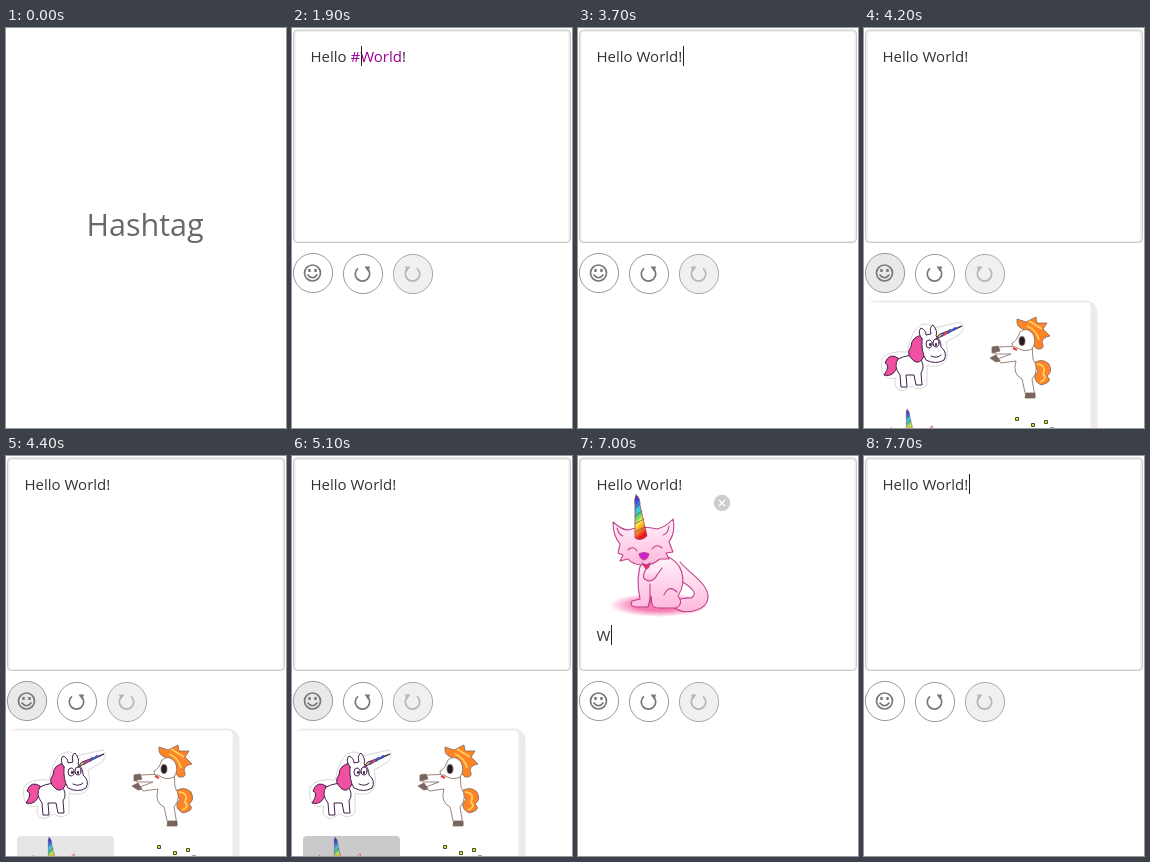
An HTML page that plays this animation: 280x400 px, repeating every 8000 ms.

```html
<!DOCTYPE html>
<html lang="en">
<head>
<meta charset="utf-8">
<title>Editor demo</title>
<style>
  html, body { margin: 0; width: 100%; height: 100%; overflow: hidden; background: #fff; }
  svg { display: block; width: 280px; height: 400px; }
  text { font: 15px "Open Sans", "Noto Sans", sans-serif; fill: #333; white-space: pre; }
  #title { font-size: 30.5px; fill: #686868; }
  .tag { fill: #980095; }
  .btn { fill: #fff; stroke: #999; }
  .icon { fill: none; stroke: #777; stroke-width: 1.7; }
</style>
</head>
<body>
<svg viewBox="0 0 280 400">
  <defs>
    <linearGradient id="rainbow" x1="0" y1="0" x2=".25" y2="1">
      <stop offset="0" stop-color="#38209c"/>
      <stop offset=".2" stop-color="#2860e0"/>
      <stop offset=".36" stop-color="#30c8e8"/>
      <stop offset=".52" stop-color="#58d868"/>
      <stop offset=".66" stop-color="#fff040"/>
      <stop offset=".82" stop-color="#ff9820"/>
      <stop offset="1" stop-color="#e81828"/>
    </linearGradient>
    <linearGradient id="fur" x1="0" y1="0" x2="0" y2="1">
      <stop offset="0" stop-color="#fff4fa"/>
      <stop offset="1" stop-color="#ffb8dc"/>
    </linearGradient>
    <radialGradient id="glow">
      <stop offset=".5" stop-color="#f87cb4"/>
      <stop offset="1" stop-color="#f87cb4" stop-opacity="0"/>
    </radialGradient>
    <g id="cat" stroke-linejoin="round" stroke-linecap="round">
      <ellipse cx="81" cy="149" rx="50" ry="12" fill="url(#glow)"/>
      <g fill="url(#fur)" stroke="#c0408c" stroke-width="1.1">
        <path d="M98 122C116 132 120 138 113 142C102 141 94 146 97 152C108 160 129 154 130 142C131 128 112 118 102 106"/>
        <path d="M64 104C58 120 60 134 62 143L54 145Q51 151 59 151H70L73 140L74 148Q75 153 86 152H98Q106 148 100 140C110 124 104 106 88 100Z"/>
        <path d="M86 139Q91 128 99 136M72 147V128" fill="none"/>
        <path d="M68 113Q63 122 68 124Q75 127 79 119L84 112" />
        <path d="M35 66Q44 74 50 74Q64 69 79 73Q88 71 95 63Q98 76 91 86L95 96L88 97L91 103L82 103Q73 110 65 109Q55 109 50 103L42 105L45 99L40 97L42 88Q35 80 35 66Z"/>
        <path d="M39 72Q41 79 45 80M91 70Q90 78 85 79M50 94Q55 89 59 95M74 93Q79 87 84 92" fill="none"/>
        <path d="M61 98Q66 95 71 98Q70 103 66 104Q62 102 61 98Z" fill="#d020d8"/>
        <path d="M64 107Q68 111 72 107Q71 113 68 113Z" fill="#ee3048"/>
      </g>
      <path d="M58 39Q62 41 62 49L69 80Q63 86 57 82V50Q56 43 58 39Z" fill="url(#rainbow)" stroke="#a83060" stroke-width=".7"/>
      <path d="M57 52L62 48M57 60L64 55M57 68L66 63M57 76L67 71" stroke="#5b4a80" stroke-width=".7"/>
    </g>
    <g id="turn" class="icon">
      <path d="M-4.5-5.7A7.2 7.2 0 1 0 5-5.2"/>
      <path d="M2-7.5H7.5L6-2Z" fill="#777" stroke="none"/>
    </g>
  </defs>

  <text id="title" y="208"></text>

  <g id="editor">
    <rect x="2.5" y="3" width="275" height="211" rx="3" fill="#fff" stroke="#eee" stroke-width="2"/>
    <rect x="1.5" y="2" width="277" height="212.5" rx="4" fill="none" stroke="#c9c9c9"/>
    <text x="18.5" y="34">Hello <tspan id="word"></tspan>!</text>
    <g id="inserted">
      <use href="#cat"/>
      <circle cx="144" cy="47" r="8.2" fill="#ccc"/>
      <path d="M141 44l6 6m0-6l-6 6" stroke="#fff" stroke-width="1.4"/>
    </g>
    <text id="typed" x="18.5" y="185"></text>
    <rect id="caret" width="1" height="20" fill="#222"/>

    <circle id="smile" class="btn" cx="21" cy="245" r="19.6"/>
    <g class="icon">
      <circle cx="20.5" cy="245" r="8"/>
      <path d="M15.5 246.5Q20.5 253 25.5 246.5"/>
      <path d="M17.5 241v3m6-3v3" stroke-width="2.4"/>
    </g>
    <circle class="btn" cx="71" cy="246" r="19.6"/>
    <use href="#turn" x="70.5" y="246"/>
    <circle class="btn" cx="121" cy="246" r="19.6" style="fill:#f1eff0;stroke:#aaa"/>
    <use href="#turn" transform="translate(120.5 246) scale(-1 1)" opacity=".48"/>

    <g id="panel">
      <rect y="272.5" width="233.5" height="160" rx="12" fill="#eee9ea"/>
      <rect y="274.5" width="226.5" height="150" rx="4" fill="#fff"/>
      <rect id="hover" x="11" y="380" width="97" height="40" rx="4"/>

      <g stroke-linejoin="round" stroke-linecap="round">
        <path d="M18 331Q24 322 43 324Q48 303 55 298Q64 293 70 300L97 294Q102 299 96 306L82 314Q86 329 79 336Q72 340 63 337V357Q56 364 48 358L38 363Q28 360 32 350Q15 354 18 331Z" fill="#fff" stroke="#d8d8d8"/>
        <g fill="#fff" stroke="#40204c" stroke-width="1">
          <path d="M34 330Q25 324 21 335Q27 337 20 347Q30 350 34 337Z" fill="#f050a0"/>
          <path d="M34 331Q46 325 55 329Q62 338 57 345L58 357H52L50 347H42L43 359H37L36 347Q29 338 34 331Z"/>
          <path d="M58 307Q47 309 47 319Q41 326 50 333Q56 337 60 328Z" fill="#f050a0"/>
          <path d="M58 311Q53 304 57 300Q62 302 62 307L67 306Q65 299 69 297Q74 303 72 308Q77 312 77 319Q84 325 80 332Q72 337 62 332Q57 324 58 311Z"/>
          <path d="M72 311L98 298L76 306Z" fill="#f8c830"/>
          <path d="M78 308L80 305M84 305L86 302M89 302L91 300" stroke="#3058e0" stroke-width="2"/>
          <path d="M80 307L82 304" stroke="#e83848" stroke-width="2"/>
          <ellipse cx="65" cy="316" rx="3" ry="4"/>
          <ellipse cx="72" cy="315" rx="3" ry="4"/>
          <path d="M66 316v1m6-1v1" stroke-width="2"/>
          <path d="M67 328Q73 331 77 327" fill="none"/>
        </g>
      </g>

      <g stroke="#81675d" stroke-width=".8" stroke-linejoin="round">
        <path d="M168 336Q178 329 185 336Q189 344 183 348Q190 354 177 357Q168 352 172 346Q177 341 168 340Z" fill="#ff8428"/>
        <path d="M155 318L136 319L128 322L131 326L147 326L134 331L137 335L152 333Q148 346 158 351L162 369H171L168 351Q176 342 169 331L168 316Z" fill="#fff"/>
        <path d="M128 319L134 318L136 323L128 325ZM132 327L136 333L132 334L126 330ZM162 365H171L171 370H161Z" fill="#77655f"/>
        <path d="M159 301Q152 299 153 291L162 294L172 289L173 295L183 295L179 301L186 308Q179 309 178 314Q182 322 173 321Q165 314 159 301Z" fill="#ff8428"/>
        <path d="M156 304Q162 298 169 306Q173 314 168 321Q160 325 152 319Q148 320 148 315Q153 313 156 304Z" fill="#fff"/>
        <path d="M163 298Q172 301 175 312M165 293L178 301M173 336Q183 337 179 346Q184 351 176 354" fill="none" stroke="#ffd05a" stroke-width="1.8"/>
        <ellipse cx="158" cy="313" rx="3" ry="4.5" fill="#231c20"/>
        <path d="M149 320l4 2" stroke="#e84038" stroke-width="2"/>
      </g>

      <use href="#cat" transform="translate(3.6 355) scale(.68)"/>
      <path d="M151 391h4m12 6h4m9-3h4m2 7h4M153 389v4m16 2v4m13-7v4" stroke="#475326" stroke-width="3"/>
      <path d="M152 391h2m14 6h2m11-3h2" stroke="#d4e640" stroke-width="2"/>
    </g>
  </g>
</svg>
<script>
const $ = id => document.getElementById(id);
const show = (id, on) => $(id).style.display = on ? '' : 'none';

// Latest value whose start time has passed.
const at = (t, steps) => steps.reduce((value, [start, next]) => t >= start ? next : value, null);

const titles = [[0, 'Hashtag'], [800, ''], [2900, 'Sticker'], [3700, '']];
const carets = [
  [1300, [59, 18]], [1900, [69, 18]], [2700, null],
  [3700, [105, 18]], [3900, null],
  [5200, [19, 169]], [5900, [33, 169]], [6000, [42, 169]], [6100, [54, 169]],
  [6700, [42, 169]], [7000, [33, 169]], [7200, [19, 169]], [7400, [19, 39]], [7700, [105, 18]]
];
const typed = [[0, ''], [5900, 'W'], [6000, 'Wo'], [6100, 'Wow'], [6700, 'Wo'], [7000, 'W'], [7200, '']];
const smileFill = [[0, '#fff'], [3900, '#dcdcdc'], [4200, '#e9e9e9'], [5200, '#fff']];
const hoverFill = [[0, '#fff'], [4300, '#f2f2f2'], [4400, '#e6e6e6'], [5100, '#cacaca']];

function draw(now) {
  const t = now % 8000;
  const title = at(t, titles);
  const tagged = t >= 1900 && t < 2900;
  const caret = at(t, carets);

  $('title').textContent = title;
  $('title').setAttribute('x', title === 'Sticker' ? 82 : 80.5);
  show('editor', !title);

  $('word').textContent = tagged ? '#World' : 'World';
  $('word').setAttribute('class', tagged ? 'tag' : '');
  $('typed').textContent = at(t, typed);
  show('caret', caret);
  if (caret) {
    $('caret').setAttribute('x', caret[0]);
    $('caret').setAttribute('y', caret[1]);
  }

  show('panel', t >= 4000 && t < 5200);
  show('inserted', t >= 5200 && t < 7400);
  $('smile').style.fill = at(t, smileFill);
  $('hover').style.fill = at(t, hoverFill);
  requestAnimationFrame(draw);
}

draw(performance.now());
</script>
</body>
</html>
```
